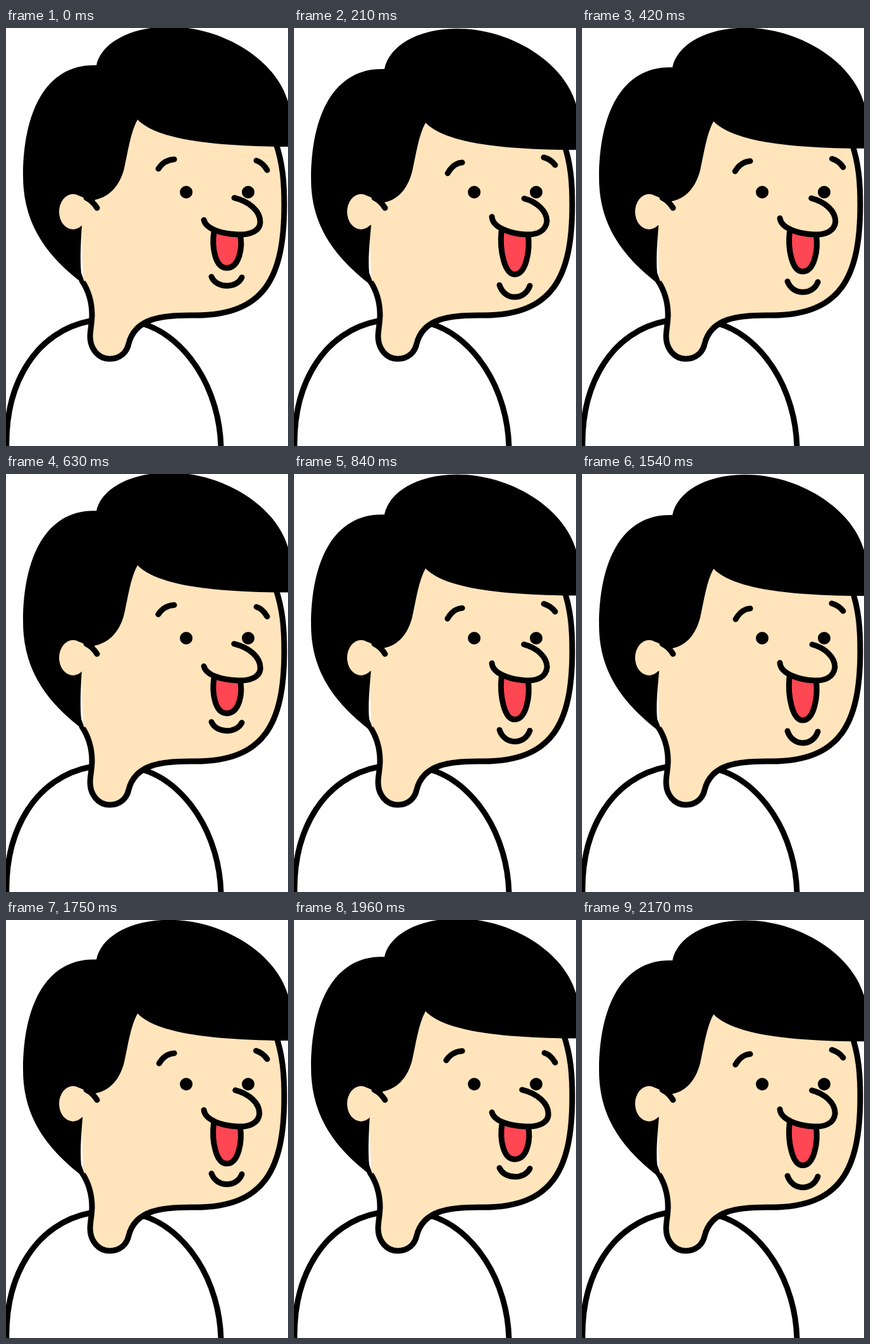
These frames come from a looping animation (446 by 662 pixels, 2.24 s). An HTML page:

```html
<!DOCTYPE html>
<html lang="en">
<head>
<meta charset="utf-8">
<title>Talking head</title>
<style>
html, body { margin: 0; width: 100%; height: 100%; overflow: hidden; background: #fff; }
svg { display: block; }
.line { fill: none; stroke: #000; stroke-width: 9; stroke-linecap: round; stroke-linejoin: round; }
.skin { fill: #ffe4bc; }
</style>
</head>
<body>
<svg width="446" height="662" viewBox="0 0 446 662">
  <path class="line" d="M133 464C50 480 -3 560 1 670M215 468C282 487 340 570 340 670"/>
  <path class="line skin" d="M426 180C438 215 440 245 440 280C440 396 408 455 300 455C245 454 204 460 194 500C191 514 180 524 164 524C146 524 133 508 133 488C133 480 136 465 136 455C136 430 128 412 120 400"/>
  <path class="skin" d="M122 402L118 260L208 130L426 180L400 260Z"/>
  <path id="hair"/>
  <ellipse class="skin" cx="106" cy="291" rx="22" ry="28"/>
  <path class="skin" d="M106 264Q128 266 146 288L122 312L106 316Z"/>
  <path class="line" d="M127 269Q137 274 144 285"/>
  <circle cx="285" cy="260" r="10"/>
  <circle cx="383" cy="260" r="10"/>
  <path class="line" id="leftBrow"/>
  <path class="line" id="rightBrow"/>
  <path class="line" id="mouth" style="fill:#ff4653"/>
  <path class="line skin" id="nose"/>
  <path class="line" id="chin"/>
</svg>
<script>
// Each moving part: its path with the jaw up, then with the jaw down
const parts = {
  hair: [
    "M450 188L425 188C330 186 240 178 208 145C197 165 193 195 187 222C180 251 162 268 141 272L120 312C118 345 117 370 119 388L126 408C75 370 27 320 27 235C27 130 65 56 143 59C150 25 195 -2 258 -2C350 -2 444 60 450 138Z",
    "M450 193L425 193C330 191 240 183 208 150C197 170 193 200 187 227C180 255 164 272 143 276L122 312C119 345 117 370 119 388L128 412C75 372 27 322 27 240C27 135 65 62 143 65C150 29 195 1 258 1C350 1 444 64 450 142Z"],
  leftBrow: ["M241 223Q250 209 266 208", "M243 230Q252 214 266 213"],
  rightBrow: ["M396 210Q406 213 413 225", "M395 205Q406 208 413 217"],
  mouth: [
    "M329 322C325 348 331 380 349 380C369 380 375 347 370 326",
    "M328 322C325 352 333 390 349 390C367 390 374 352 370 326"],
  nose: [
    "M361 269C385 275 402 290 402 307C402 322 385 328 366 327C340 326 316 318 313 304",
    "M364 270C384 275 400 290 400 306C398 322 384 328 366 327C345 326 314 317 313 299"],
  chin: ["M325 394C333 413 365 413 373 395", "M325 407C333 432 365 432 373 408"]
};
const LOOP = 2240, STEP = 70, BEAT = 2000 / 3, TOP = 600;

function blend(from, to, k) {
  const ends = to.match(/-?\d+/g);
  let i = 0;
  return from.replace(/-?\d+/g, n => (+n + (ends[i++] - n) * k).toFixed(2));
}

function draw(now) {
  const t = Math.floor(now % LOOP / STEP) * STEP;
  const drop = (1 - Math.cos((t - TOP) / BEAT * 2 * Math.PI)) / 2;
  const k = (drop - 0.1) / 0.82;
  for (const id in parts)
    document.getElementById(id).setAttribute("d", blend(...parts[id], k));
}

let start;
function tick(now) {
  start ??= now;
  draw(now - start);
  requestAnimationFrame(tick);
}
draw(0);
requestAnimationFrame(tick);
</script>
</body>
</html>
```
